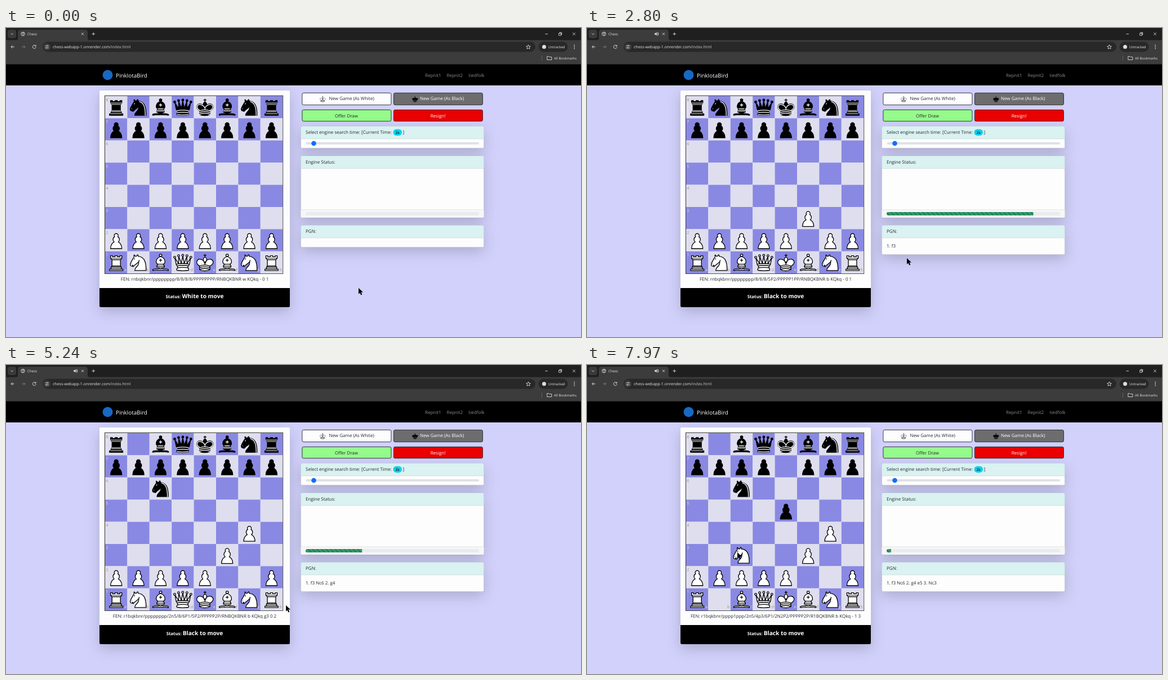
Animation of 1021x549 px, one loop 8 s. Source, as an HTML page:

```html
<!DOCTYPE html>
<html lang="en">
<head>
<meta charset="utf-8">
<title>Chess</title>
<style>
html, body { margin: 0; width: 100%; height: 100%; overflow: hidden; background: #d1d1fb; }
svg { display: block; width: 100vw; height: 100vh; }
text { font: 8px "Open Sans", "Noto Sans", sans-serif; fill: #26292d; text-rendering: geometricPrecision; white-space: pre; }
.mid { text-anchor: middle; }
.shadow { filter: drop-shadow(0 8.5px 12.5px rgba(0,0,0,.175)); }
.body { fill: #fdfdfd; }
.head { fill: #daf2f1; }
.edge { fill: none; stroke: #000; stroke-opacity: .16; stroke-width: .6; }
.ui text { fill: #e6e6e6; font-size: 6.2px; }
.icon { fill: none; stroke: #dedede; stroke-width: .9; }
.nav text { fill: #8b8b8b; }
.white { fill: #fff; stroke: #000; color: #000; --lit: none; }
.black { fill: #000; stroke: #000; color: #fff; --lit: #fff; }
.white, .black { stroke-width: 1.5; stroke-linecap: round; stroke-linejoin: round; }
.line { fill: none; stroke: currentColor; }
.lit { fill: none; stroke: var(--lit); }
</style>
</head>
<body>
<svg viewBox="0 0 1021 549">
<defs>
  <g id="p"><path d="M22.5 9c-2.21 0-4 1.79-4 4 0 .89.29 1.71.78 2.38C17.33 16.5 16 18.59 16 21c0 2.03.94 3.84 2.41 5.03-3 1.06-7.41 5.55-7.41 13.47h23c0-7.92-4.41-12.41-7.41-13.47 1.47-1.19 2.41-3 2.41-5.03 0-2.41-1.33-4.5-3.28-5.62.49-.67.78-1.49.78-2.38 0-2.21-1.79-4-4-4z"/></g>
  <g id="r"><path d="M9 39h27v-3H9zM12 36v-4h21v4zM12.5 32l1.5-2.5h17l1.5 2.5zM14 29.5V17h17v12.5zM14 17l-3-3V9h4v2h5V9h5v2h5V9h4v5l-3 3z"/>
    <path class="line" stroke-width="1.1" d="M12 35.7h21M13 31.8h19M14 29.5h17M14 17h17M11 14h23"/></g>
  <g id="n"><path d="M22 10c10.5 1 16.5 8 16 29H15c0-9 10-6.5 8-21"/>
    <path d="M24 18c.38 2.91-5.55 7.37-8 9-3 2-2.82 4.34-5 4-1.04-.94 1.41-3.04 0-3-1 0 .19 1.23-1 2-1 0-4 1-4-4 0-2 6-12 6-12s1.89-1.9 2-3.5c-.73-1-.5-2-.5-3 1-1 3 2.5 3 2.5h2s.78-2 2.5-3c1 0 1 3 1 3"/>
    <path class="line" stroke-width="1.2" d="M9 25.4v.2M14.9 14.6l-.8 1.6"/>
    <path class="lit" d="M24.8 11.3c7 1.7 12 8.7 11.5 27.7"/></g>
  <g id="b"><path d="M9 36c3.39-.97 10.11.43 13.5-2 3.39 2.43 10.11 1.03 13.5 2 0 0 1.65.54 3 2-.68.97-1.65.99-3 .5-3.39-.97-10.11.46-13.5-1-3.39 1.46-10.11.03-13.5 1-1.35.49-2.32.47-3-.5 1.35-1.94 3-2 3-2zM15 32c2.5 2.5 12.5 2.5 15 0 .5-1.5 0-2 0-2 0-2.5-2.5-4-2.5-4 5.5-1.5 6-11.5-5-15.5-11 4-10.5 14-5 15.5 0 0-2.5 1.5-2.5 4 0 0-.5.5 0 2z"/>
    <circle cx="22.5" cy="8" r="2.5"/>
    <path class="line" d="M17.5 26h10M15 30h15m-7.5-14.5v5M20 18h5"/></g>
  <g id="q"><path d="M9 26c8.5-1.5 21-1.5 27 0l2.5-12.5L31 25l-.3-14.1-5.2 13.6-3-14.5-3 14.5-5.2-13.6L14 25 6.5 13.5zM9 26c0 2 1.5 2 2.5 4 1 1.5 1 1 .5 3.5-1.5 1-1.5 2.5-1.5 2.5-1.5 1.5.5 2.5.5 2.5 6.5 1 16.5 1 23 0 0 0 1.5-1 0-2.5 0 0 .5-1.5-1-2.5-.5-2.5-.5-2 .5-3.5 1-2 2.5-2 2.5-4-8.5-1.5-18.5-1.5-27 0z"/>
    <circle cx="6" cy="12" r="2"/><circle cx="14" cy="9" r="2"/><circle cx="22.5" cy="8" r="2"/><circle cx="31" cy="9" r="2"/><circle cx="39" cy="12" r="2"/>
    <path class="line" d="M11 29.5c7-1.2 16-1.2 23 0M12 33.5c6-1 15-1 21 0"/><path class="lit" d="M11 37.5c6.5 1 16.5 1 23 0"/></g>
  <g id="k"><path d="M22.5 11.63V6M20 8h5M22.5 25s4.5-7.5 3-10.5c0 0-1-2.5-3-2.5s-3 2.5-3 2.5c-1.5 3 3 10.5 3 10.5M11.5 37c5.5 3.5 15.5 3.5 21 0v-7s9-4.5 6-10.5c-4-6.5-13.5-3.5-16 4V27v-3.5c-3.5-7.5-13-10.5-16-4-3 6 5 10 5 10z"/>
    <path class="line" d="M11.5 30c5.5-3 15.5-3 21 0m-21 3.5c5.5-3 15.5-3 21 0m-21 3.5c5.5-3 15.5-3 21 0"/>
    <path class="lit" d="M32 29.5s8.5-4 6-9.65C34.15 14 25 18 22.5 24.5v2.1-2.1C20 18 9.9 14 7 19.85c-2.5 5.65 4.85 9 4.85 9"/></g>
  <pattern id="stripes" width="8" height="8" patternUnits="userSpaceOnUse">
    <path fill="#198754" d="M0 0h8v8H0z"/>
    <path fill="#fff" fill-opacity=".16" d="M0 4v4h4zM0 0h4l4 4v4z"/>
  </pattern>
  <clipPath id="barClip"><rect x="532" y="327" width="308" height="6" rx="3"/></clipPath>
</defs>

<path fill="#d1d1fb" d="M0 0h1021v549H0z"/>

<g class="ui">
  <path fill="#1f1f1f" d="M0 0h1021v22H0z"/>
  <path fill="#3c3c3c" d="M0 21.5h1021V65H0z"/>
  <path fill="#3c3c3c" d="M17 22q4 0 4-4V8q0-5 5-5h114q5 0 5 5v10q0 4 4 4z"/>
  <rect x="3" y="3" width="15" height="15" rx="4" fill="#3a3a3a"/>
  <path class="icon" d="M8.5 9.5l2.2 2.2 2.2-2.2M134 8.5l4 4m0-4l-4 4M152.500 10.500h5.500m-2.750-2.750v5.500"/>
  <circle class="icon" cx="30" cy="10.500" r="3.300"/>
  <path class="icon" d="M27.500 9q3 0 3 2t-1.500 2.500M30 7.500q.5 2 3 2"/>
  <text x="38" y="13">Chess</text>
  <g id="sound" class="icon"><path fill="#dedede" stroke="none" d="M120 9.300h1.800l2-1.900v6.200l-2-1.900H120z"/><path d="M124.800 8.800q1.400 1.700 0 3.400M125.500 7.300q3 3.200 0 6.400"/></g>
  <path class="icon" d="M957.500 10.700h4.500M981.700 9.300h3.800v3.800h-3.800zM983 9.200V8h3.700v3.800h-1.200M1006.300 8.300l4.500 4.500m0-4.500l-4.500 4.500"/>
  <path class="icon" d="M14.800 33.500H9m2.800-2.800L9 33.500l2.800 2.800M52.700 31.700a3 3 0 1 0 .5 2.300M53 30v2.300h-2.400"/>
  <path class="icon" stroke-opacity=".4" d="M28 33.500h5.800M31 30.700l2.800 2.800-2.800 2.800"/>
  <rect x="65" y="24.500" width="875" height="18" rx="9" fill="#282828"/>
  <circle cx="72.800" cy="33.500" r="6.300" fill="#3c3c3c"/>
  <path class="icon" d="M69.500 31.700h2.500M74 31.700h2M69.500 35.300h2M73.500 35.300h2.500"/>
  <circle class="icon" cx="73.400" cy="31.700" r=".9"/><circle class="icon" cx="72.200" cy="35.300" r=".9"/>
  <text x="83" y="36" style="font-size:7px">chess-webapp-1.onrender.com<tspan fill="#c4c4c4">/index.html</tspan></text>
  <path class="icon" d="M927.500 29.800l1.100 2.500 2.700.3-2 1.800.6 2.700-2.400-1.400-2.400 1.400.6-2.700-2-1.800 2.700-.3z"/>
  <rect x="945.500" y="24.500" width="52" height="18" rx="9" fill="#282828"/>
  <circle cx="955.500" cy="33.500" r="3.500" fill="#dedede"/>
  <text x="963" y="35.700">Untracked</text>
  <path fill="#dedede" d="M1008.500 29.800h1.500v1.500h-1.500zM1008.500 32.800h1.500v1.500h-1.500zM1008.500 35.800h1.500v1.500h-1.500z"/>
  <path class="icon" stroke-opacity=".25" d="M951.500 49v9"/>
  <path class="icon" d="M960.800 50.500h3l1 1h4v5h-8z"/>
  <text x="973" y="55.500" style="font-size:6px">All Bookmarks</text>
</g>

<g class="nav">
  <path d="M0 64.500h1021V102H0z"/>
  <circle cx="180.500" cy="83.500" r="9" fill="#1769c4"/>
  <text x="195" y="87.500" style="font-size:9.800px;fill:#fff">PinkIotaBird</text>
  <text x="744" y="87">Repnit1</text><text x="782.500" y="87">Repnit2</text><text x="821.500" y="87">tiedfolk</text>
</g>

<rect class="body shadow" x="166" y="111" width="338" height="385" rx="2.500"/>
<path d="M166 462h338v31.500q0 2.500-2.500 2.500h-333q-2.500 0-2.500-2.500z"/>
<g id="board"></g>
<text id="fen" class="mid" x="335" y="448.500"></text>
<text class="mid" x="335" y="479.500" style="fill:#fff;font-weight:700;font-size:7.800px">Status: <tspan id="turn" font-size="10.200"></tspan></text>

<g stroke="#212529" stroke-width=".9">
  <rect x="525.900" y="115.400" width="158" height="21.300" rx="2.500" fill="#fdfdff"/>
  <rect x="688.400" y="115.400" width="158" height="21.300" rx="2.500" fill="#6d6d6d"/>
  <rect x="525.900" y="145.400" width="158" height="20.300" rx="2.500" fill="#95fb8b"/>
  <rect x="688.400" y="145.400" width="158" height="20.300" rx="2.500" fill="#ea0000"/>
</g>
<use href="#k" class="white" transform="translate(555.800 119.800) scale(.29)"/>
<use href="#k" class="black" style="--lit:none;color:#6d6d6d" transform="translate(719.800 119.800) scale(.29)"/>
<text x="573.500" y="128.300">New Game (As White)</text>
<text x="735" y="128.300" style="fill:#fff">New Game (As Black)</text>
<text class="mid" x="604.500" y="158.500">Offer Draw</text>
<text class="mid" x="767" y="158.500" style="fill:#fff">Resign!</text>

<g id="cards"></g>
<text x="532" y="188.300">Select engine search time: [Current Time:</text>
<rect x="687.500" y="179.700" width="15.500" height="11.500" rx="5.700" fill="#0fd0ee"/>
<text class="mid" x="695.200" y="187.800" style="font-size:6.300px;font-weight:700">2s</text>
<text x="704.500" y="188.300">]</text>
<rect x="532.500" y="203" width="307.500" height="4" rx="2" fill="#dee2e6"/>
<circle cx="546.500" cy="205" r="4.300" fill="#0d6efd"/>
<text x="532" y="241">Engine Status:</text>
<text id="reply" x="532" y="267"></text>
<path fill="#f6f6f7" d="M523.500 323h325v11.500q0 2.500-2.500 2.500H526q-2.500 0-2.500-2.500z"/>
<path class="edge" d="M523.500 322.800h325"/>
<rect x="532" y="327" width="308" height="6" rx="3" fill="#e9ecef"/>
<g clip-path="url(#barClip)"><rect id="bar" x="532" y="327" height="6" fill="url(#stripes)"/></g>
<text x="532" y="364.300">PGN:</text>
<text id="pgn" x="532" y="390"></text>

<g id="pieces"></g>
<path id="cursor" d="M0 0v10.700l2.500-2.300 1.800 4 2-.9-1.800-3.900h3.500z"/>
</svg>

<script>
const $ = id => document.getElementById(id);
const LOOP = 8000, SEARCH = 2000, X0 = 176, Y0 = 121, SQ = 39.4;

// Cursor path: time, x, y
const path = [
  [0, 626, 462], [760, 386, 376], [820, 386, 376], [1070, 391, 338], [1300, 391, 338],
  [2100, 568, 409], [3450, 568, 409], [4200, 432, 376], [4280, 432, 376], [4560, 431, 299],
  [4680, 431, 299], [5220, 497, 427], [5800, 511, 434], [6950, 511, 434], [7440, 235, 417],
  [7530, 235, 417], [7880, 267, 333], [8000, 267, 333]
];

// A move with a pick time is dragged by the cursor; the others slide by themselves.
const moves = [
  { from: 'f2', to: 'f3', pick: 820, at: 1110 },
  { from: 'b8', to: 'c6', at: 3330 },
  { from: 'g2', to: 'g4', pick: 4280, at: 4590 },
  { from: 'e7', to: 'e5', at: 6862 },
  { from: 'b1', to: 'c3', pick: 7530, at: 7920 }
];
const pgn = ['', '1. f3', ' Nc6', ' 2. g4', ' e5', ' 3. Nc3'];
const fens = [
  'rnbqkbnr/pppppppp/8/8/8/8/PPPPPPPP/RNBQKBNR w KQkq - 0 1',
  'rnbqkbnr/pppppppp/8/8/8/5P2/PPPPP1PP/RNBQKBNR b KQkq - 0 1',
  'r1bqkbnr/pppppppp/2n5/8/8/5P2/PPPPP1PP/RNBQKBNR w KQkq - 1 2',
  'r1bqkbnr/pppppppp/2n5/8/6P1/5P2/PPPPP2P/RNBQKBNR b KQkq g3 0 2',
  'r1bqkbnr/pppp1ppp/2n5/4p3/6P1/5P2/PPPPP2P/RNBQKBNR w KQkq e6 0 3',
  'r1bqkbnr/pppp1ppp/2n5/4p3/6P1/2N2P2/PPPPP2P/R1BQKBNR b KQkq - 1 3'
];

const clamp = v => Math.max(0, Math.min(1, v));
const swing = v => .5 - Math.cos(Math.PI * clamp(v)) / 2;
const mix = (a, b, k) => a.map((v, i) => v + (b[i] - v) * k);
const center = sq => [X0 + (sq.charCodeAt(0) - 96.5) * SQ, Y0 + (8.5 - sq[1]) * SQ];

function drawBoard() {
  let out = `<rect x="${X0 - .5}" y="${Y0 - .7}" width="316.200" height="316.200" fill="none" stroke="#303030"/>`;
  const tint = dark => dark ? '#f0d9b5' : '#b58863';
  for (let r = 0; r < 8; r++) for (let c = 0; c < 8; c++)
    out += `<rect x="${X0 + c * SQ}" y="${Y0 + r * SQ}" width="${SQ}" height="${SQ}" fill="${(r + c) % 2 ? '#8989e3' : '#dedeef'}"/>`;
  for (let i = 0; i < 8; i++) {
    out += `<text x="${X0 + 1.2}" y="${Y0 + i * SQ + 8.5}" style="font-size:7px;fill:${tint(i % 2)}">${8 - i}</text>`;
    out += `<text x="${X0 + (i + 1) * SQ - 1.5}" y="431.500" text-anchor="end" style="font-size:7px;fill:${tint(i % 2 == 0)}">${'abcdefgh'[i]}</text>`;
  }
  $('board').innerHTML = out;
}

const card = (y, h) => `<rect class="body shadow" x="523.500" y="${y}" width="325" height="${h}" rx="2.500"/>
  <path class="head" d="M523.500 ${y + 22.500}v-20q0-2.500 2.500-2.500h320q2.500 0 2.500 2.500v20z"/>
  <path class="edge" d="M523.500 ${y + 22.500}h325"/>
  <rect class="edge" x="523.500" y="${y}" width="325" height="${h}" rx="2.500"/>`;

function makePieces() {
  const list = [];
  for (const [rank, row, color] of [[7, 'pppppppp', 'black'], [2, 'pppppppp', 'white'], [8, 'rnbqkbnr', 'black'], [1, 'rnbqkbnr', 'white']])
    [...row].forEach((kind, i) => {
      const el = document.createElementNS('http://www.w3.org/2000/svg', 'use');
      el.setAttribute('href', '#' + kind);
      el.setAttribute('class', color);
      $('pieces').append(el);
      const home = 'abcdefgh'[i] + rank;
      list.push({ el, home, move: moves.find(m => m.from == home) });
    });
  return list;
}

function cursorAt(t) {
  const i = Math.max(1, path.findIndex(p => p[0] >= t));
  const [a, b] = [path[i - 1], path[i]];
  return mix(a.slice(1), b.slice(1), swing((t - a[0]) / (b[0] - a[0])));
}

function pieceAt({ home, move }, t) {
  const start = center(home);
  if (!move || t < (move.pick || move.at)) return start;
  if (t < move.at) return cursorAt(t);
  const begin = move.pick ? cursorAt(move.at) : start;
  return mix(begin, center(move.to), swing((t - move.at) / (move.pick ? 50 : 200)));
}

let shown = -1;
function showState(n) {
  if (n == shown) return;
  shown = n;
  const last = moves[n - 1];
  $('fen').textContent = 'FEN: ' + fens[n];
  $('turn').textContent = (n % 2 ? 'Black' : 'White') + ' to move';
  $('pgn').textContent = pgn.slice(0, n + 1).join('');
  $('reply').textContent = last && !last.pick ? last.from + last.to : '';
  $('sound').style.display = n ? '' : 'none';
  $('cards').innerHTML = card(174.500, 39) + card(227, 110) + card(350.500, n ? 52 : 39);
}

drawBoard();
const pieces = makePieces();

function frame() {
  const t = performance.now() % LOOP;
  const n = moves.filter(m => t >= m.at).length;
  showState(n);
  for (const p of pieces) {
    const [x, y] = pieceAt(p, t);
    p.el.setAttribute('transform', `translate(${x - SQ / 2} ${y - SQ / 2}) scale(${SQ / 45})`);
  }
  $('bar').setAttribute('width', n % 2 ? 308 * clamp((t - moves[n - 1].at) / SEARCH) : 0);
  $('stripes').setAttribute('patternTransform', `translate(${532 + 8 * (1 - t % 1000 / 1000)} 327)`);
  $('cursor').setAttribute('transform', `translate(${cursorAt(t)})`);
  requestAnimationFrame(frame);
}
frame();
</script>
</body>
</html>
```
